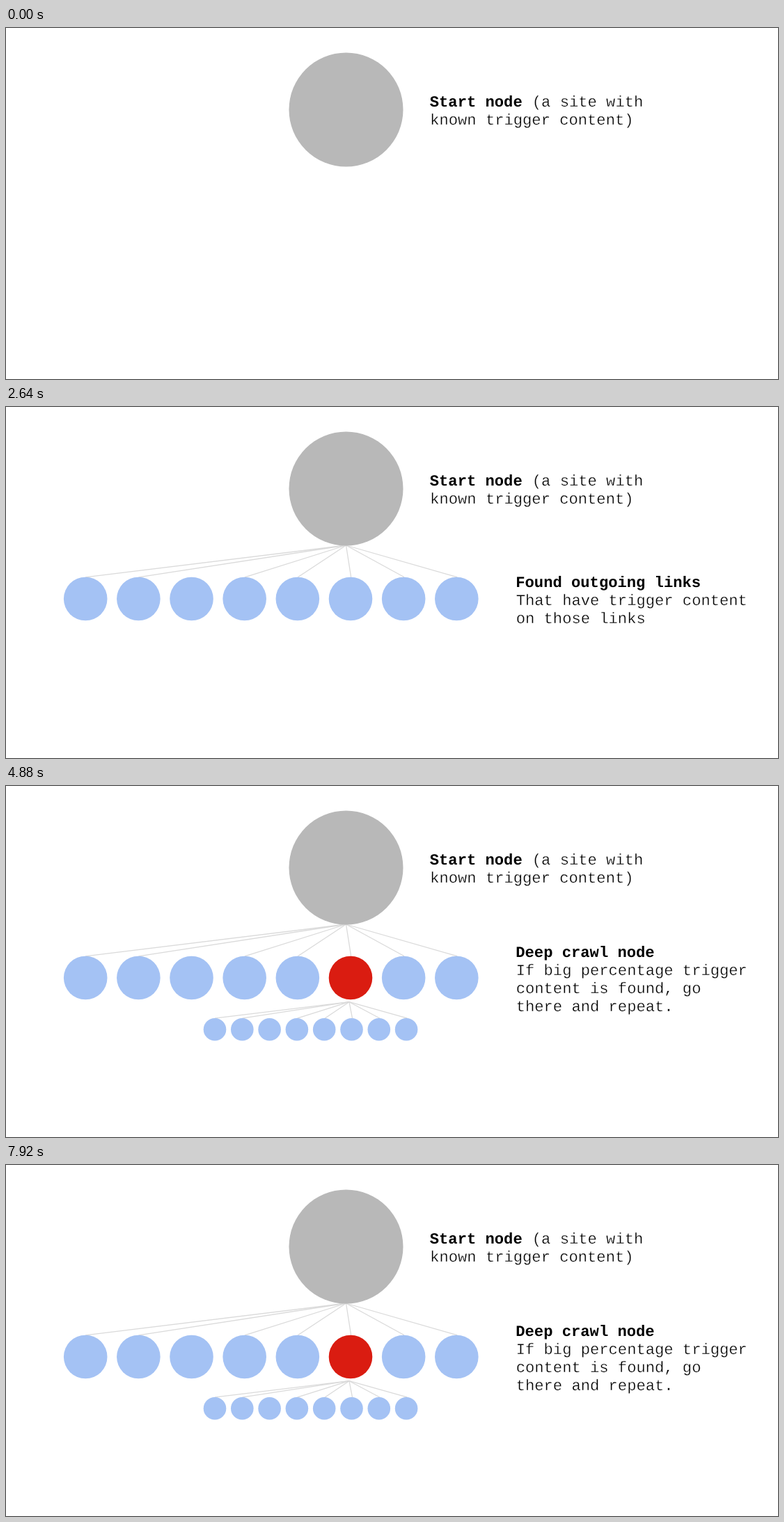
Write an HTML page with a canvas that moves like this. It is 1109 by 505 pixels and loops after 8 s.

```html
<!DOCTYPE html>
<html lang="en">
<head>
<meta charset="utf-8">
<title>Crawl tree</title>
<style>
  html, body { margin: 0; width: 100%; height: 100%; overflow: hidden; background: #fff; }
  canvas { display: block; }
</style>
</head>
<body>
<canvas id="stage" width="1109" height="505"></canvas>
<script>
const ctx = document.getElementById('stage').getContext('2d');
const LOOP = 8000, LINKS_AT = 1200, DEEP_AT = 4000;
const BLUE = '#a4c2f4', RED = '#da1c11', GREY = '#b8b8b8';
const LINE_HEIGHT = 26.1;

function dot(x, y, r, color) {
  ctx.fillStyle = color;
  ctx.beginPath();
  ctx.arc(x, y, r, 0, Math.PI * 2);
  ctx.fill();
}

// A row of eight child nodes; the third has no edge to its parent.
function row({ root, x, y, r, gap, edgeY, edgeGap }, hot = -1) {
  ctx.strokeStyle = '#dadada';
  ctx.lineWidth = 1.3;
  for (let i = 0; i < 8; i++) {
    if (i === 2) continue;
    ctx.beginPath();
    ctx.moveTo(...root);
    ctx.lineTo(x + i * edgeGap, edgeY);
    ctx.stroke();
  }
  for (let i = 0; i < 8; i++) dot(x + i * gap, y, r, i === hot ? RED : BLUE);
}

function write(text, x, y, bold) {
  ctx.font = `${bold ? 'bold ' : ''}22.15px "Liberation Mono", "Courier New", monospace`;
  ctx.fillStyle = '#000';
  ctx.fillText(text, x, y);
  if (bold) return;
  // A fine white outline thins the regular weight.
  ctx.strokeStyle = '#fff';
  ctx.lineWidth = 0.4;
  ctx.strokeText(text, x, y);
}

function label(x, y, title, lines) {
  write(title, x, y, true);
  lines.forEach((line, i) => write(line, x + 0.4, y + (i + 1) * LINE_HEIGHT));
}

const links = { root: [488.5, 199], x: 114.2, y: 276, r: 31.3, gap: 76.16, edgeY: 244.8, edgeGap: 76.3 };
const deep = { root: [493, 310.7], x: 300, y: 350.3, r: 16.3, gap: 39.3, edgeY: 334.2, edgeGap: 39.5 };

function draw(t) {
  ctx.fillStyle = '#fff';
  ctx.fillRect(0, 0, 1109, 505);
  ctx.textRendering = 'geometricPrecision';
  ctx.lineJoin = 'round';

  const isDeep = t >= DEEP_AT;
  if (t >= LINKS_AT) row(links, isDeep ? 5 : -1);
  if (isDeep) row(deep);
  dot(488.5, 117.5, 82, GREY);

  label(608.8, 113, 'Start node', ['known trigger content)']);
  write('(a site with', 755.8, 113);

  if (isDeep) {
    label(732.3, 245.8, 'Deep crawl node',
      ['If big percentage trigger', 'content is found, go', 'there and repeat.']);
  } else if (t >= LINKS_AT) {
    label(732.3, 259, 'Found outgoing links',
      ['That have trigger content', 'on those links']);
  }
}

function tick() {
  draw(performance.now() % LOOP);
  requestAnimationFrame(tick);
}
tick();
</script>
</body>
</html>
```
